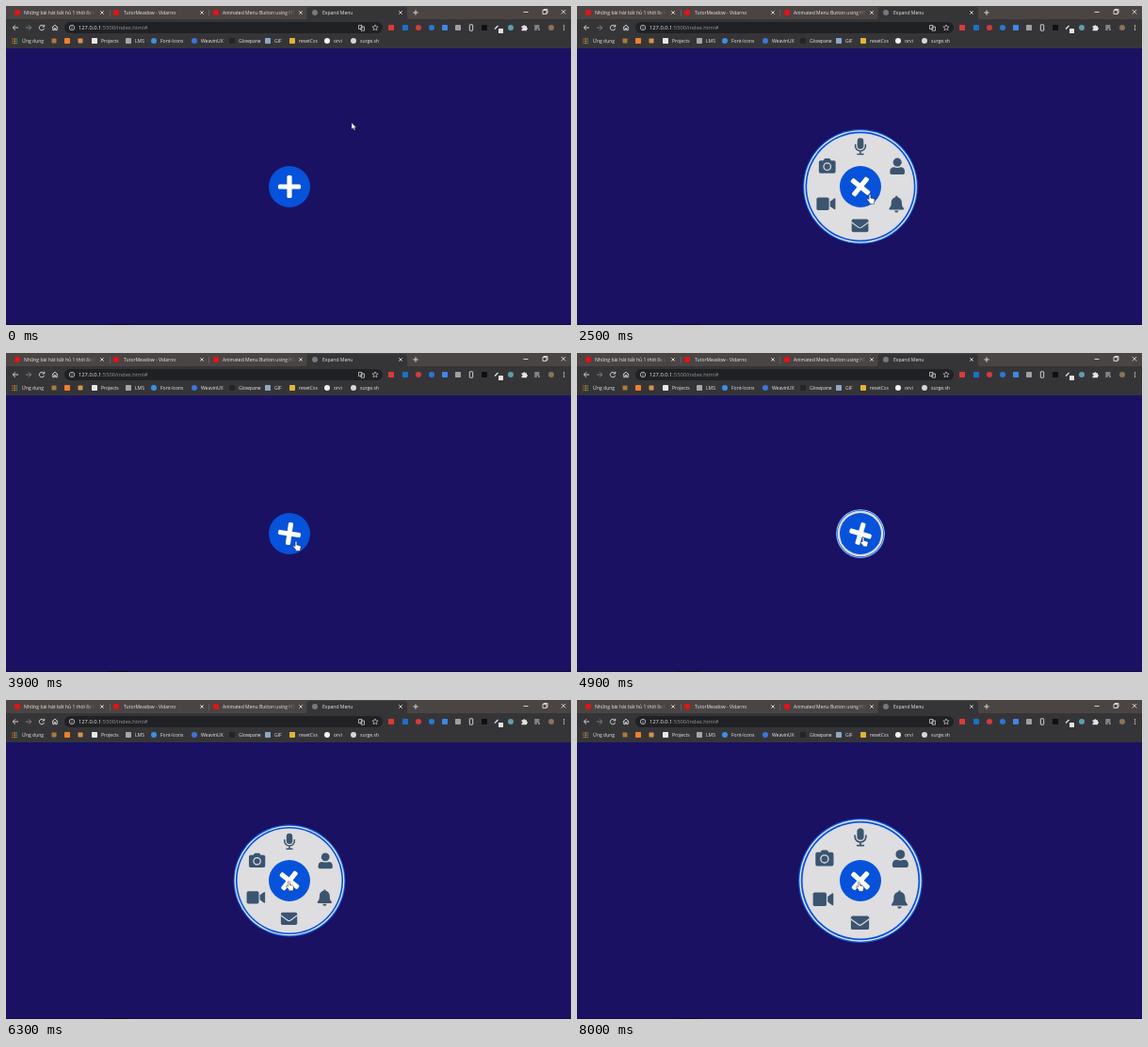
These frames come from a looping animation (600 px wide and 339 px high, 8100 ms). An HTML page:

```html
<!DOCTYPE html>
<html lang="vi">
<head>
<meta charset="utf-8">
<title>Expand Menu</title>
<style>
html, body { margin: 0; width: 100%; height: 100%; overflow: hidden; background: #1a1163; }
svg { display: block; width: 100%; height: 100%; }
text { font: 5.05px "Open Sans", "Noto Sans", sans-serif; fill: #eceaea; }
.url { font-size: 5.75px; }
.line { fill: none; stroke: #e4e2e2; stroke-width: .9; }
.icons { fill: #3b5570; }
</style>
</head>
<body>
<svg viewBox="0 0 600 339">
  <defs>
    <linearGradient id="fade"><stop offset=".87" stop-color="#eceaea"/><stop offset="1" stop-color="#4a4543"/></linearGradient>
  </defs>
  <rect width="600" height="339" fill="#1a1163"/>
  <rect y="338.2" width="600" height=".8" fill="#100c38"/>
  <rect x="107" y="338" width="24" height="1" fill="#0b0a18"/>

  <rect width="600" height="15" fill="#4a4543"/>
  <rect y="14" width="600" height="31" fill="#353538"/>
  <path d="M317 15q2.5 0 2.5-3V4q0-3 3-3H423q3 0 3 3v8q0 3 2.5 3z" fill="#353538"/>
  <path d="M110.5 4v7M215.500 4v7" class="line" style="stroke:#77716e;stroke-width:.6"/>
  <rect x="62" y="17" width="338" height="12" rx="6" fill="#202124"/>
  <g id="chrome"></g>
  <text x="19" y="9.200" fill="url(#fade)" style="fill:url(#fade)">Những bài hát bất hủ 1 thời 8x 9</text>
  <text x="230" y="9.200" style="fill:url(#fade)">Animated Menu Button using HT</text>
  <text class="url" x="77" y="25">127.0.0.1<tspan fill="#98989c">:5500/index.html#</tspan></text>

  <!-- window and toolbar controls -->
  <g class="line">
    <path d="M435 4.300v5.400M432.300 7h5.400M549.500 6.500h5M570 4.500h4v4h-4zM571 4.500v-1h4v4h-1M589.800 4l4.400 4.400M594.200 4l-4.400 4.400"/>
    <path d="M13 23H7.500M10 20.300L7.300 23 10 25.700"/>
    <path d="M21 23h5.500M24 20.300l2.700 2.700-2.700 2.700" stroke="#8a888a"/>
    <path d="M40.300 21.600a2.700 2.700 0 1 0 .3 2.300M40.700 19.800v2.200h-2.200"/>
    <path d="M48.900 23L52 20.200l3.100 2.800M49.800 22.500v3.200h1.500v-2h1.400v2h1.500v-3.200"/>
    <circle cx="70" cy="23" r="2.700" stroke-width=".7"/>
    <path d="M70 22.700v1.700M70 21.300v.6" stroke-width=".7"/>
    <path d="M392 19.900l.9 2 2.200.2-1.700 1.500.5 2.100-1.900-1.100-1.900 1.100.5-2.100-1.700-1.500 2.200-.2z" stroke-width=".6"/>
    <path d="M374.500 20.500h3.500v4h-3.500zM377 22h3.500v4.200H377z" stroke-width=".7"/>
    <path d="M561.300 21h5M561.300 23h5M561.300 25h2.500M566 24v2"/>
    <path d="M592.500 20.200v1.200M592.500 22.400v1.200M592.500 24.600v1.200" stroke-width="1.200"/>
    <rect x="492.300" y="19.800" width="3.400" height="6.400" rx=".5"/>
    <path d="M519 24.500l3.500-3.500" stroke-width="1.300"/>
  </g>
  <path d="M547.500 21.200h1.800a1 1 0 0 1 2 0h1.700v1.700a1 1 0 0 1 0 2v1.300h-5.500v-1.500a1 1 0 0 0 0-2z" fill="#e4e2e2"/>
  <rect x="523" y="24" width="5" height="5" rx=".5" fill="#e2e2e2"/>

  <g id="wheel">
    <circle r="70" fill="#145fe0"/>
    <circle r="68.700" fill="#e4e8f2"/>
    <circle r="67.200" fill="#0752da"/>
    <circle r="65.300" fill="#dedde0"/>
    <g class="icons">
      <g transform="translate(0 -49)">
        <rect x="-3.800" y="-10.300" width="7.600" height="13.400" rx="3.800"/>
        <path d="M-6.200-2v1.300a6.200 6.200 0 0 0 12.400 0V-2M0 5.500V9M-3.500 9.300h7" fill="none" stroke="#3b5570" stroke-width="1.800" stroke-linecap="round"/>
      </g>
      <g transform="translate(45 -25)">
        <circle cy="-4.700" r="5.200"/>
        <path d="M-9 8V6.500Q-9 1.300-3.800 1.300 0 3 3.800 1.300 9 1.300 9 6.500V8q0 2-2 2H-7q-2 0-2-2z"/>
      </g>
      <path transform="translate(44 21)" d="M-1.200-9.800h2.400v1.600C5-7.500 6.400-4.500 6.400-1.500c0 4 1 5.200 2.300 6.700.8 1 .2 2-.9 2H-7.800c-1.100 0-1.700-1-.9-2 1.300-1.500 2.300-2.700 2.300-6.700 0-3 1.400-6 5.200-6.700zM-2.500 8.200h5a2.500 2.300 0 0 1-5 0z"/>
      <g transform="translate(-.5 47.500)">
        <rect x="-10.200" y="-7.800" width="20.400" height="15.600" rx="2"/>
        <path d="M-10.500-4.200L-2 2q2 1.500 4 0l8.500-6.200" fill="none" stroke="#dedde0" stroke-width="1.300"/>
      </g>
      <g transform="translate(-42 21)">
        <rect x="-11.500" y="-7.800" width="15.200" height="15.600" rx="2"/>
        <path d="M5-3l5-3.600q1.500-.8 1.500.9V5.700q0 1.700-1.500.9L5 3z"/>
      </g>
      <g transform="translate(-40.500 -25.500)">
        <path d="M-8.200-6.500h3.600l1-2Q-3.300-9-2.500-9h5q.8 0 1.100.5l1 2h3.600q2 0 2 2V7q0 2-2 2H-8.200q-2 0-2-2v-11.500q0-2 2-2z"/>
        <circle cy="1" r="4.300" fill="none" stroke="#dedde0" stroke-width="1.400"/>
      </g>
    </g>
  </g>
  <circle cx="301" cy="192" r="22" fill="#0752da"/>
  <g id="plus" fill="#fff">
    <rect x="-12" y="-2.600" width="24" height="5.200" rx="1.600"/>
    <rect x="-2.600" y="-12" width="5.200" height="24" rx="1.600"/>
  </g>
  <path id="arrow" d="M0 0v7l1.600-1.400 1.200 2.500 1.100-.5-1.100-2.400H5z" fill="#fff" stroke="#222" stroke-width=".4"/>
  <path id="hand" d="M-.9.800Q0-.8.900.8V4l3.200.7q1.200.4 1 1.800L4.500 8.500V10.300H-.3V9L-2.900 6q-.4-1.200.6-1.300L-.9 5.500z" fill="#fff" stroke="#222" stroke-width=".5"/>
</svg>
<script>
const $ = id => document.getElementById(id);
const LOOP = 8100, SPIN = 1000, CX = 301, CY = 192;

// Flat marks, labels and tab crosses
const dot = (x, y, color, r = 3) => `<circle cx="${x}" cy="${y}" r="${r}" fill="${color}"/>`;
const box = (x, y, color, s = 6) =>
  `<rect x="${x - s / 2}" y="${y - s / 2}" width="${s}" height="${s}" rx=".7" fill="${color}"/>`;
const label = (x, y, s) => `<text x="${x}" y="${y}">${s}</text>`;
const cross = x => `<path class="line" d="M${x - 1.700} 5.300l3.400 3.400m0-3.400l-3.400 3.400"/>`;

let ui = [102, 208, 313, 419].map(cross).join("");
ui += [12, 117, 223].map(x => box(x, 7, "#ee1111", 5.500)).join("");
ui += dot(328, 7, "#77787c") + label(125, 9.200, "TutorMeadow - Vidarno") + label(336, 9.200, "Expand Menu");

const grid = ["#e34b3d", "#e8b93a", "#4aa35a"];
for (let i = 0; i < 9; i++) ui += box(7 + i % 3 * 2.200, 35 + (i / 3 | 0) * 2.200, grid[i % 3], 1.500);
ui += label(17, 39, "Ứng dụng");
ui += box(51, 37, "#a9793f", 5) + box(65, 37, "#f0802a") + box(79, 37, "#d69350", 5);
const marks = [
  [94, box, "#e8e8e8", "Projects"], [130, box, "#a8a6a6", "LMS"],
  [157, dot, "#3d8fe0", "Font-Icons"], [200, dot, "#3f74d8", "WeavinUX"],
  [240, box, "#242426", "Glowpane"], [278, box, "#8da7c4", "GIF"],
  [304, box, "#e3b23c", "resetCss"], [341, dot, "#f2f2f2", "orvi"],
  [369, dot, "#d6d6d6", "surge.sh"]
];
for (const [x, shape, color, name] of marks) ui += shape(x, 37, color) + label(x + 7, 39, name);

const tools = [
  [409, box, "#dc3b35"], [424, box, "#1c70c8"], [438, dot, "#d83a3a"], [452, dot, "#2878d8"],
  [466, box, "#4285e8"], [480, box, "#a0a0a2"], [508, box, "#101012"], [536, dot, "#5f9cae"], [579, dot, "#8c7259"]
];
for (const [x, shape, color] of tools) ui += shape(x, 23, color);
$("chrome").innerHTML = ui;

const clamp = x => Math.min(1, Math.max(0, x));

// cubic-bezier(.42, 0, .58, 1)
function easeInOut(x) {
  let lo = 0, hi = 1;
  for (let i = 0; i < 24; i++) {
    const u = (lo + hi) / 2, v = 1 - u;
    if (3 * v * v * u * .42 + 3 * v * u * u * .58 + u * u * u < x) lo = u; else hi = u;
  }
  return lo * lo * (3 - 2 * lo);
}

const clicks = [1750, 3200, 4475, 6030, 7170];
const openness = t => clicks.reduce((p, c, i) => p + (i % 2 ? -1 : 1) * easeInOut(clamp((t - c) / SPIN)), 0);

// time, x, y of the pointer tip
const path = [
  [0, 367, 124], [900, 318, 202], [1100, 317, 201], [1200, 317, 201], [1300, 317, 200.500],
  [1400, 317, 200.500], [1500, 311, 200], [3200, 311, 200], [3800, 308, 200], [4600, 308, 200],
  [5200, 300, 191], [6000, 300, 191], [6600, 301, 194], [7200, 301, 194], [7800, 299.500, 193], [LOOP, 299.500, 193]
];
function pointer(t) {
  const i = path.findIndex(p => p[0] > t);
  const [t0, x0, y0] = path[i - 1], [t1, x1, y1] = path[i];
  const k = easeInOut((t - t0) / (t1 - t0));
  return [x0 + (x1 - x0) * k, y0 + (y1 - y0) * k];
}

function draw(now) {
  const t = Math.floor(now % LOOP / 100) * 100;
  const p = openness(t), [x, y] = pointer(t);
  $("wheel").setAttribute("transform", `translate(${CX} ${CY}) scale(${p})`);
  $("plus").setAttribute("transform", `translate(${CX} ${CY}) rotate(${45 * p})`);
  const over = Math.hypot(x - CX, y - CY) < 22;
  for (const id of ["arrow", "hand"]) {
    $(id).setAttribute("transform", `translate(${x} ${y})`);
    $(id).setAttribute("visibility", over === (id === "hand") ? "visible" : "hidden");
  }
}

const start = performance.now();
function tick() {
  draw(performance.now() - start);
  requestAnimationFrame(tick);
}
tick();
</script>
</body>
</html>
```
